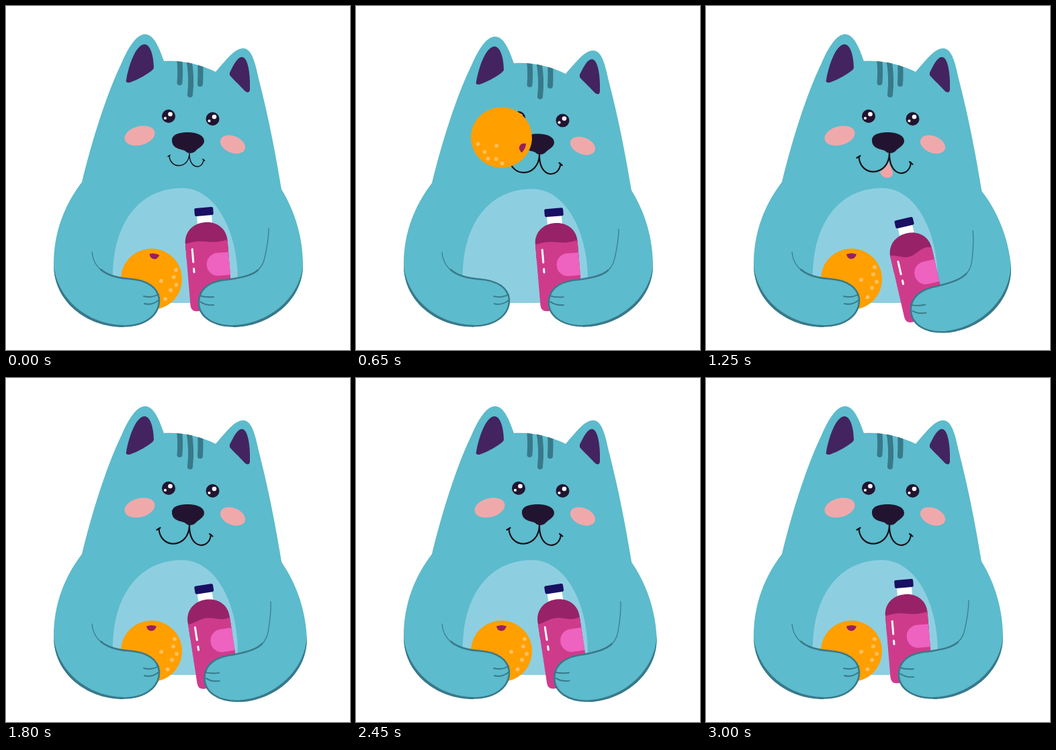
These frames come from a looping animation (512 by 512 pixels, 3.05 s). An HTML page with a canvas:

```html
<!DOCTYPE html>
<html lang="en">
<head>
<meta charset="utf-8">
<title>Cat with orange and bottle</title>
<style>
html, body { margin: 0; width: 100%; height: 100%; overflow: hidden; background: #fff; }
canvas { display: block; }
</style>
</head>
<body>
<canvas id="stage" width="512" height="512"></canvas>
<script>
const ctx = document.getElementById('stage').getContext('2d');
const LOOP = 3050, STEP = 50, TAU = Math.PI * 2;
const FUR = '#5cbbcc', LINE = '#38798a', INK = '#221430', BLUSH = '#f0a9ab';

const shape = d => new Path2D(d);
const body = shape('M110 275L113 262C128 200 150 130 172 85C182 62 194 42 207 42C220 42 228 62 235 82C262 80 290 87 312 98C328 80 340 63 353 63C366 63 371 85 376 108C392 170 402 225 410 273L411.500 283L405 400L400 442L120 442L105 400Z');
const belly = shape('M162 442C147 345 186 271 262 271C322 271 355 362 342 442Z');
const ears = shape('M179 110C182 92 192 58 206 57C216 57 220 78 220 92C219 98 190 113 183 114C179 114 178 112 179 110ZM333 99C338 89 344 76 351 76C361 76 364 105 363 125C362 130 358 129 355 126C347 117 336 107 333 103Z');
const stripes = shape('M258 78Q260 95 258.500 114M272 78Q277 105 274 132M289 80Q290 100 289 116');
const nose = shape('M247 200C247 190 260 188 271 188C283 188 295 192 295 201C295 208 286 211 282 216C278 220 270 220 267 216C264 213 247 214 247 200Z');
const mouth = shape('M224.500 226L229.500 223M227.500 224C229 255 272 255 273 219C272 256 303 256 305 233M303 232L307.500 235.500');
const tongue = shape('M272 232C274 240 279 246 278 250C276 258 262 258 259 247C265 243 270 237 272 232Z');
const navel = shape('M-7.500 -37Q0 -40 7.500 -37Q5 -30 0 -30Q-6 -30 -7.500 -37Z');
const bottle = shape('M-31.500 46C-31.500 28 -18 16 0 16C18 16 31.500 28 31.500 46L31.500 137Q31.500 147 21.500 147L-21.500 147Q-31.500 147 -31.500 137Z');

const leftArm = {
  fill: shape('M124 250L113 262C88 295 71 335 71 385C71 440 120 477 175 477C210 477 229 458 228 436C226 420 212 408 183 406C160 404 131 398 128 366L150 290Z'),
  shade: shape('M71 385C71 440 120 478 175 478L175 475C122 474 76 437 71 385Z'),
  line: shape('M174 476.500C210 476.500 229 458 228 436C226 420 212 408 183 406C169 405 152 402 141 392'),
  thin: shape('M183 406C160 404 131 398 128 366'),
  fingers: shape('M205 432Q217 435 227 429M206 443Q217 446 227 438')
};
const rightArm = {
  fill: shape('M400 259L410 273C430 305 442 345 442 385C442 440 390 477 338 477C305 477 285 460 287 438C289 420 303 409 332 407C362 403 380 398 385 375C389 357 391 345 391 331L390 280Z'),
  shade: shape('M442 385C442 440 390 478 338 478L338 475C388 474 437 437 442 385Z'),
  line: shape('M339 476.500C305 476.500 285 460 287 438C289 420 303 409 332 407C352 404 366 401 375 393'),
  thin: shape('M332 407C362 403 380 398 385 375C389 357 391 345 391 331'),
  fingers: shape('M309 433Q297 434 288 431M309 445Q297 446 289 440')
};

const clamp = v => Math.min(1, Math.max(0, v));
const ease = (t, a, b) => (1 - Math.cos(Math.PI * clamp((t - a) / (b - a)))) / 2;
// Rises from a to b, falls back from b to c.
const bump = (t, a, b, c) => t < b ? ease(t, a, b) : 1 - ease(t, b, c);

function group(draw) {
  ctx.save();
  draw();
  ctx.restore();
}

function fill(path, color) {
  ctx.fillStyle = color;
  ctx.fill(path);
}

function stroke(path, color, width) {
  ctx.strokeStyle = color;
  ctx.lineWidth = width;
  ctx.stroke(path);
}

function oval(x, y, rx, ry, color, angle = 0) {
  ctx.fillStyle = color;
  ctx.beginPath();
  ctx.ellipse(x, y, rx, ry, angle, 0, TAU);
  ctx.fill();
}

const dot = (x, y, r, color) => oval(x, y, r, r, color);

function box(x, y, w, h, r, color) {
  ctx.fillStyle = color;
  ctx.beginPath();
  ctx.roundRect(x, y, w, h, r);
  ctx.fill();
}

function scaleAt(x, y, sx, sy) {
  ctx.translate(x, y);
  ctx.scale(sx, sy);
  ctx.translate(-x, -y);
}

function rotateAt(x, y, angle) {
  ctx.translate(x, y);
  ctx.rotate(angle);
  ctx.translate(-x, -y);
}

function drawEye(x, y) {
  dot(x, y, 10, INK);
  dot(x + 2.5, y - 3, 3.3, '#fff');
  dot(x - 5, y + 3, 2.1, '#fff');
}

function drawCat(t, squash) {
  fill(body, FUR);
  group(() => {
    ctx.clip(body);
    stroke(stripes, LINE, 8);
  });
  fill(ears, '#442460');
  group(() => {
    const s = 1 + 0.058 * squash * squash;
    scaleAt(251.5, 442, s, s);
    fill(belly, '#8dcfe1');
  });
  oval(199, 193, 23, 14, BLUSH, -0.26);
  oval(337.5, 206, 19.5, 12.5, BLUSH, 0.4);
  drawEye(242, 164);
  drawEye(307.5, 168);

  const lick = ease(t, 1050, 1250) - ease(t, 1450, 1650);
  if (lick > 0) group(() => {
    scaleAt(271, 234, lick, lick);
    fill(tongue, '#f4a4a7');
  });
  group(() => {
    const s = 1 - 0.34 * (1 - clamp(t / 850)) ** 2;
    scaleAt(273, 220, s, s);
    stroke(mouth, '#151018', 2.2);
  });
  fill(nose, INK);
}

function drawOrange(t, swing, dip) {
  const up = 564, down = 1000, rest = 406.5;
  let x = 216.5, y = rest, turn = 0;
  if (t < up) {
    x -= 28 * swing;
    y += 26.5 * swing;
    turn = 7 + 15 * swing;
  } else if (t < down) {
    const u = (t - up) / (down - up);
    y = 70 + (rest - 70) * (2 * u - 1) ** 2;
    turn = 7 + 353 * (1 - (1 - u) ** 1.68);
  } else {
    x -= 5 * dip;
    y += 18.5 * dip;
  }
  ctx.translate(x, y);
  ctx.rotate(turn * Math.PI / 180);
  dot(0, 0, 45.5, '#ff9f00');
  fill(navel, '#96215f');
  const pores = [[34.5, -18], [32.5, -7], [37.5, 4], [30.5, 13], [24, 27], [14.5, 1]];
  for (const [px, py] of pores) dot(px, py, 3, '#ffbf5c');
}

function drawBottle(tilt) {
  ctx.translate(294.5 + 0.6 * tilt, 306 + 19 * tilt);
  ctx.rotate(-0.083 - 0.165 * tilt);
  box(-11, 4, 22, 18, 2, '#fff');
  box(-14, -6, 28, 12, 2.5, '#190f63');
  ctx.clip(bottle);
  ctx.fillStyle = '#982267';
  ctx.fillRect(-32, 10, 64, 60);

  const crest = -13 + 48 * tilt * tilt, height = 1.5 + 2.8 * tilt;
  ctx.fillStyle = '#cf3b8b';
  ctx.beginPath();
  ctx.moveTo(-32, 150);
  for (let x = -32; x <= 32; x += 2) {
    ctx.lineTo(x, 45 + tilt * 2.5 - height * Math.cos(TAU * (x - crest) / 56));
  }
  ctx.lineTo(32, 150);
  ctx.fill();

  box(-2.3, 63, 50, 34, 16.5, '#ee62c0');
  box(-23.4, 53, 3, 22, 1.5, '#fff');
  box(-23.4, 82, 3, 8, 1.5, '#fff');
}

function drawArm(arm) {
  fill(arm.fill, FUR);
  fill(arm.shade, LINE);
  stroke(arm.thin, LINE, 1.2);
  stroke(arm.line, LINE, 2.5);
  stroke(arm.fingers, LINE, 1.9);
}

function drawScene(t) {
  const squash = bump(t, 0, 390, 750);
  const swing = bump(t, 0, 300, 550);
  const dip = bump(t, 1000, 1080, 1190);
  const shake = clamp((t - 1000) / 1959) * 3;
  const tilt = (1 - Math.cos(TAU * shake)) / 2;

  scaleAt(256, 452, 1, 1 - 0.0475 * squash);
  group(() => drawCat(t, squash));
  group(() => drawOrange(t, swing, dip));
  group(() => drawBottle(tilt));
  group(() => {
    ctx.translate(-dip, 4.6 * swing + 15.5 * dip);
    rotateAt(125, 275, 0.23 * swing + 0.03 * dip);
    drawArm(leftArm);
  });
  group(() => {
    ctx.translate(0, 3.5 * tilt);
    rotateAt(400, 272, -0.12 * tilt);
    drawArm(rightArm);
  });
}

function render(t) {
  ctx.fillStyle = '#fff';
  ctx.fillRect(0, 0, 512, 512);
  ctx.lineCap = ctx.lineJoin = 'round';
  group(() => drawScene(t));
}

const start = performance.now();
function tick() {
  const t = (performance.now() - start) % LOOP;
  render(Math.floor(t / STEP) * STEP);
  requestAnimationFrame(tick);
}
tick();
</script>
</body>
</html>
```
